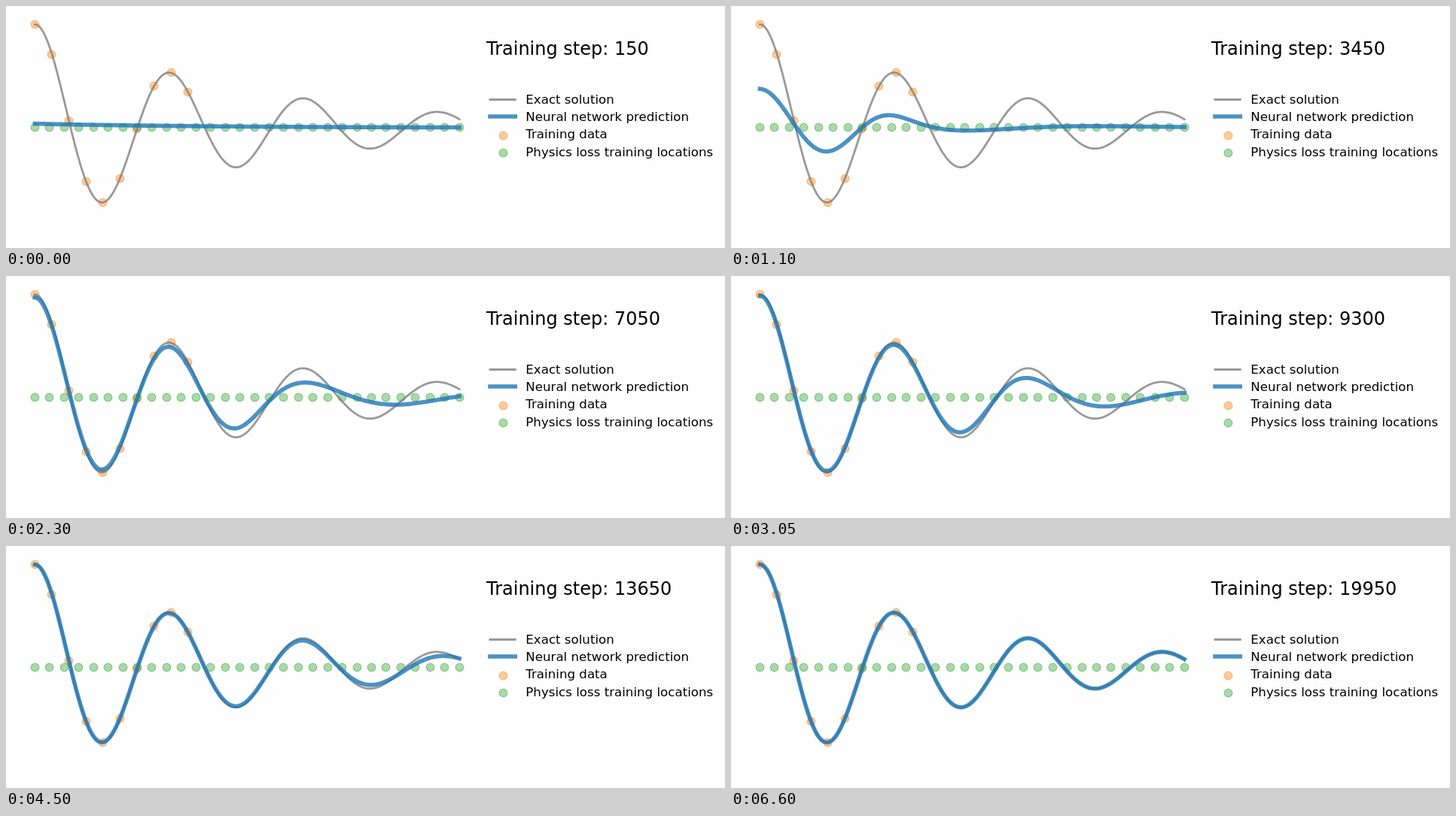
Write an HTML page that moves like this. It is 955 px wide and 322 px high and loops after 6650 ms.

```html
<!DOCTYPE html>
<html lang="en">
<head>
<meta charset="utf-8">
<title>Training a damped oscillator network</title>
<style>
  html, body { margin: 0; width: 100%; height: 100%; overflow: hidden; background: #fefefe; }
  svg { display: block; }
  text { font-family: "DejaVu Sans", sans-serif; font-size: 16.67px; fill: #000; }
  #step { font-size: 24px; }
  .exact, .guess { fill: none; stroke-opacity: .8; stroke-linecap: square; stroke-linejoin: round; }
  .exact { stroke: #808080; stroke-width: 2.78px; }
  .guess { stroke: #1f77b4; stroke-width: 5.56px; }
  .dot { fill-opacity: .4; stroke-opacity: .4; stroke-width: 1.39px; }
  .data { fill: #ff7f0e; stroke: #ff7f0e; }
  .physics { fill: #2ca02c; stroke: #2ca02c; }
</style>
</head>
<body>
<svg width="955" height="322" viewBox="0 0 955 322">
  <g id="dots"></g>
  <path id="exact" class="exact"/>
  <path id="guess" class="guess"/>
  <text id="step" x="638" y="65"></text>
  <path class="exact" d="M643 124.5H676.3"/>
  <path class="guess" d="M643 147H676.3"/>
  <text x="690.3" y="130">Exact solution</text>
  <text x="690.3" y="153">Neural network prediction</text>
  <text x="690.3" y="176">Training data</text>
  <text x="690.3" y="200">Physics loss training locations</text>
</svg>
<script>
const LOOP = 6650, TICK = 50, STEPS_PER_TICK = 150;
const LEFT = 38.4, WIDTH = 563.8, ZERO = 161.5, UNIT = 137;
const DAMPING = 2, OMEGA = Math.sqrt(396), SAMPLES = 300;
const LEARNING = 1550;
const $ = id => document.getElementById(id);

const mix = (a, b, k) => a + (b - a) * k;
const clamp = (v, lo, hi) => Math.min(hi, Math.max(lo, v));
const smooth = (from, to, v) => {
  const k = clamp((v - from) / (to - from), 0, 1);
  return k * k * (3 - 2 * k);
};
const toX = u => LEFT + WIDTH * u;
const toY = v => ZERO - UNIT * v;

function wave(u, gain = 1, lag = 0) {
  const phase = OMEGA * u - lag;
  return gain * Math.exp(-DAMPING * u) * (Math.cos(phase) + DAMPING / OMEGA * Math.sin(phase));
}

// Nearly flat output before the network starts to learn, in pixels above zero.
function flat(u, t) {
  const first = 5.5 * Math.exp(-2.4 * u) - .6;
  const later = 9.5 * Math.exp(-4 * u) + 3.5 * u * u - 2.6;
  return mix(first, later, Math.min(t / 600, 1.2)) * clamp((1300 - t) / 500, 0, 1);
}

// The fit is learned from left to right: behind a moving front it matches the
// exact wave, beyond it the wave is weaker and lags, until everything converges.
function prediction(t) {
  const age = Math.max(t, 1000), progress = Math.log(age / LEARNING);
  const done = smooth(3600, 5250, t);
  const top = smooth(750, LEARNING, t) * (1 - .073 * Math.exp((LEARNING - age) / 800));
  const floor = Math.min(top, .37 * smooth(700, 2300, t));
  const front = .425 + .295 * progress;
  const width = .08 + .033 * progress;

  const lagAge = Math.max(t, 1400);
  const lagStart = .8 - 680 / lagAge;
  const lagRate = 2.4 + 11400 / lagAge;

  return u => {
    const learned = mix(floor, top, 1 / (1 + Math.exp((u - front) / width)));
    const lag = lagRate * Math.max(0, u - lagStart) ** 1.65;
    return wave(u, mix(learned, 1, done), lag * (1 - done)) + flat(u, t) / UNIT;
  };
}

function curve(f) {
  const points = [];
  for (let i = 0; i <= SAMPLES; i++) {
    const u = i / SAMPLES;
    points.push(toX(u).toFixed(2) + " " + toY(f(u)).toFixed(2));
  }
  return "M" + points.join("L");
}

// Dots sit on pixel centres.
function dot(kind, x, y) {
  const circle = document.createElementNS("http://www.w3.org/2000/svg", "circle");
  circle.setAttribute("class", "dot " + kind);
  circle.setAttribute("cx", Math.floor(x) + .5);
  circle.setAttribute("cy", Math.floor(y) + .5);
  circle.setAttribute("r", 5.38);
  $("dots").append(circle);
}

for (let i = 0; i < 10; i++) {
  const u = i * 20 / 499;
  dot("data", toX(u), toY(wave(u)));
}
for (let i = 0; i < 30; i++) dot("physics", toX(i / 29), ZERO);
dot("data", 660, 172);
dot("physics", 660, 195);
$("exact").setAttribute("d", curve(u => wave(u)));

function draw(tick) {
  $("guess").setAttribute("d", curve(prediction(tick * TICK)));
  $("step").textContent = "Training step: " + (tick + 1) * STEPS_PER_TICK;
}

const start = performance.now();
let shown = -1;
function frame() {
  const elapsed = Math.max(0, performance.now() - start) % LOOP;
  const tick = Math.floor(elapsed / TICK);
  if (tick !== shown) draw(shown = tick);
  requestAnimationFrame(frame);
}
frame();
</script>
</body>
</html>
```
